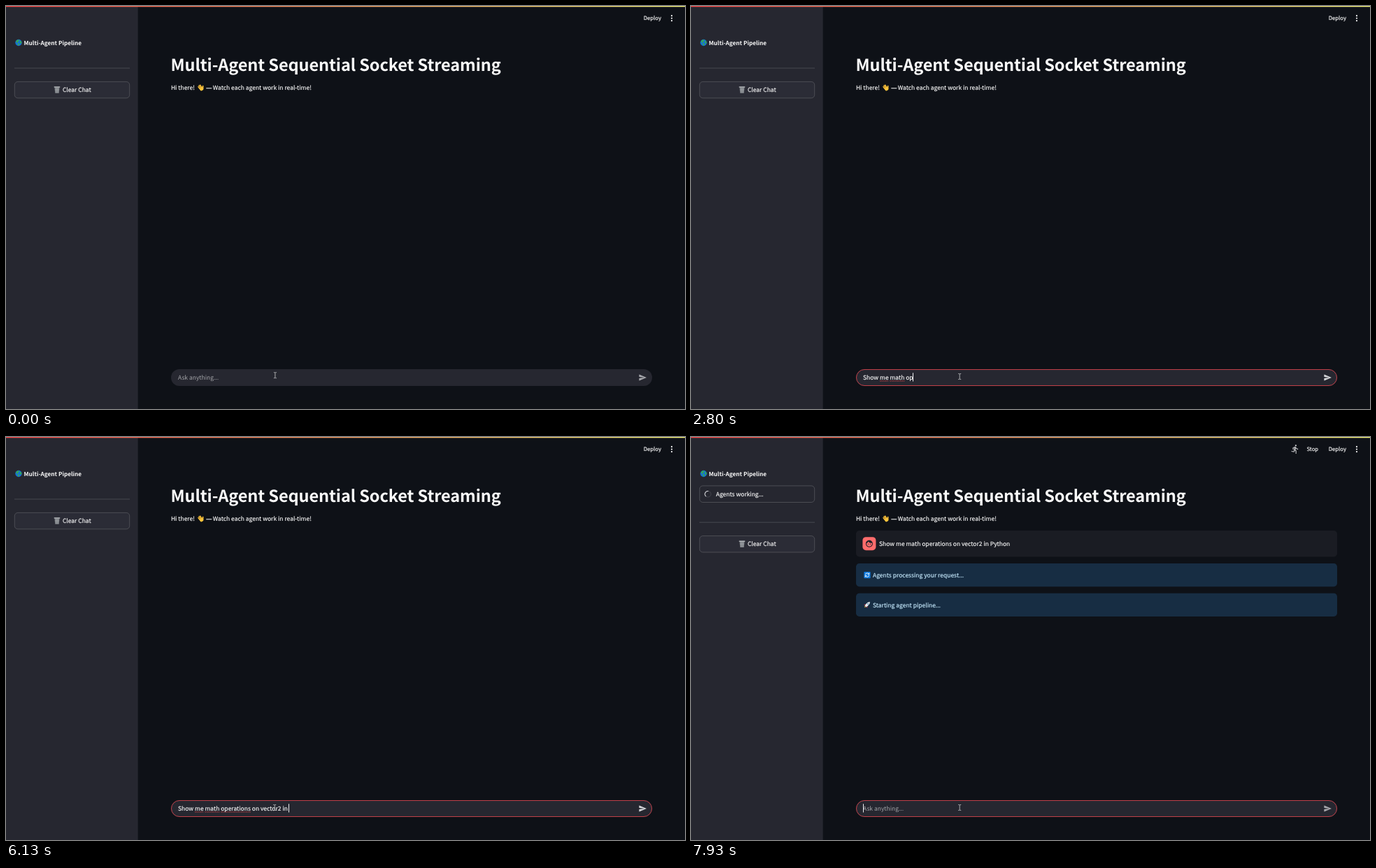
These frames come from a looping animation (971 px wide and 577 px high, 8000 ms). An HTML page:

```html
<!DOCTYPE html>
<html lang="en">
<head>
<meta charset="utf-8">
<title>Multi-Agent Pipeline</title>
<style>
  html, body { margin: 0; width: 100%; height: 100%; overflow: hidden; background: #0e1117; }
  svg { display: block; width: 100%; height: 100%; }
  text {
    font: 8.49px "Noto Sans CJK JP", "Noto Sans CJK SC", "Noto Sans", sans-serif;
    fill: #fafafa; stroke: #fafafa; stroke-width: .15px;
    white-space: pre; text-rendering: geometricPrecision;
  }
  .title { font-size: 23.6px; font-weight: 700; letter-spacing: -.13px; stroke: none; }
  .bold { font-size: 8.24px; font-weight: 700; stroke: none; }
  .small { font-size: 7.7px; }
  .dash { font-family: "Noto Sans", sans-serif; }
  .hint { fill: #a5a6aa; stroke: none; }
  .info text { fill: #c7ebff; stroke: #c7ebff; }
  .panel { fill: #172d43; }
  .outline { stroke: #515259; stroke-width: .9; }
  .squiggle { stroke: #e5484a; stroke-width: 1; stroke-dasharray: 1.6 .8; opacity: .85; }
</style>
</head>
<body>
<svg viewBox="0 0 971 577" preserveAspectRatio="none">
  <defs>
    <linearGradient id="bar"><stop stop-color="#ff4b4b"/><stop offset="1" stop-color="#fffd80"/></linearGradient>
  </defs>
  <rect width="971" height="577" fill="#0e1117"/>
  <rect width="188.7" height="577" fill="#262730"/>
  <rect width="971" height="1.25" fill="url(#bar)"/>

  <!-- sidebar -->
  <g transform="translate(18 52.5)">
    <circle r="4.7" fill="#1673cf"/>
    <path d="M-3.6-2.5Q-2-4.6 1-4.2L.4-2.4-1-1.2-1.4.6-3-.6ZM-1 .8 1.4 1.4.8 3.2-.4 4.2-1.2 2.4ZM2-2.6 3.8-2 4.4.4 3 1.6 1.8-.4Z" fill="#35a853"/>
  </g>
  <text class="bold" x="25.6" y="55.6">Multi-Agent Pipeline</text>
  <g id="status">
    <rect class="outline" x="12.3" y="69.9" width="164.4" height="23.6" rx="4.6" fill="none"/>
    <circle cx="24.2" cy="81.7" r="4.3" fill="none" stroke="#45464e"/>
    <path id="spinner" d="M-4.15-1.1A4.3 4.3 0 0 1 4.15-1.1" fill="none" stroke="#dcdce0"/>
    <text x="35.8" y="85">Agents working...</text>
  </g>
  <g id="lower">
    <path d="M12 89h165" stroke="#4b4c54" stroke-width=".9"/>
    <rect class="outline" x="12.3" y="108.4" width="164.4" height="23.4" rx="4.6" fill="#2b2c36"/>
    <g transform="translate(73 120)">
      <path d="M-3.6-3.4H3.6L2.8 4.8H-2.8Z" fill="#777b80"/>
      <path d="M-1.6-3 -1.2 4.4M0-3V4.4M1.6-3 1.2 4.4M-3 0H3" stroke="#a5a9ad" stroke-width=".6"/>
      <rect x="-4.4" y="-4.8" width="8.8" height="1.6" rx=".7" fill="#b4b8bb"/>
    </g>
    <text x="80.9" y="123.3">Clear Chat</text>
  </g>

  <!-- toolbar -->
  <g id="running">
    <path id="wheels" transform="translate(856.5 9.9) scale(.6)" fill="#d2d3d6" d="M18 2.54a2 2 0 1 0 .01 0zM15 17h-2c0 1.65-1.35 3-3 3s-3-1.35-3-3 1.35-3 3-3v-2c-2.76 0-5 2.24-5 5s2.24 5 5 5 5-2.24 5-5zm3-3.5h-1.86l1.67-3.67C18.42 8.5 17.44 7 15.96 7h-5.2c-.81 0-1.54.47-1.87 1.2L8.22 10l1.92.53.65-1.53H13l-1.83 4.1c-.6 1.33.39 2.9 1.85 2.9H18v5h2v-5.5c0-1.1-.9-2-2-2z"/>
    <path id="runner" transform="translate(856.8 10.2) scale(.6)" fill="#b4b5b8" d="M13.49 5.48c1.1 0 2-.9 2-2s-.9-2-2-2-2 .9-2 2 .9 2 2 2zm-3.6 13.9l1-4.4 2.1 2v6h2v-7.5l-2.1-2 .6-3c1.3 1.5 3.3 2.5 5.5 2.5v-2c-1.9 0-3.5-1-4.3-2.4l-1-1.6c-.4-.6-1-1-1.7-1-.3 0-.5.1-.8.1l-5.2 2.2v4.7h2v-3.4l1.8-.7-1.6 8.1-4.9-1-.4 2 7 1.4z"/>
    <text class="small" x="880.5" y="20.4">Stop</text>
  </g>
  <text class="small" x="911.8" y="20.4">Deploy</text>
  <g fill="#fafafa"><circle cx="952" cy="13.9" r="1.1"/><circle cx="952" cy="17.5" r="1.1"/><circle cx="952" cy="21.1" r="1.1"/></g>

  <!-- heading -->
  <text class="title" x="235.6" y="93">Multi-Agent Sequential Socket Streaming</text>
  <text x="235.9" y="120.4">Hi there!</text>
  <g transform="translate(278.6 117.2) rotate(-35)" stroke="#fcc43c" stroke-width="1.5" stroke-linecap="round">
    <rect x="-2.6" y="-.8" width="5.4" height="5" rx="2" fill="#fcc43c" stroke="none"/>
    <path d="M-2 0V-3.4M-.2 0V-4.2M1.5 0V-3.8M2.4 2 4-.4"/>
    <path d="M-1.1-.4V-3M.7-.4V-3.4" stroke="#c98a1c" stroke-width=".35"/>
  </g>
  <text class="dash" x="285.9" y="120.4">—</text>
  <text x="295.7" y="120.4">Watch each agent work in real-time!</text>

  <!-- conversation -->
  <g id="chat">
    <rect x="236" y="134" width="688" height="37.4" rx="4.7" fill="#1a1c23"/>
    <rect x="245.4" y="143.2" width="19" height="19" rx="4.7" fill="#ff6c6c"/>
    <path transform="translate(248.9 146.8) scale(.5)" fill="#20222a" d="M9 11.75a1.25 1.25 0 1 0 .01 0zm6 0a1.25 1.25 0 1 0 .01 0zM12 2C6.48 2 2 6.48 2 12s4.48 10 10 10 10-4.48 10-10S17.52 2 12 2zm0 18c-4.41 0-8-3.59-8-8 0-.29.02-.58.05-.86 2.36-1.05 4.23-2.98 5.21-5.37C11.07 8.33 14.05 10 17.42 10c.78 0 1.53-.09 2.25-.26.21.71.33 1.47.33 2.26 0 4.41-3.59 8-8 8z"/>
    <text x="269" y="156.4">Show me math operations on vector2 in Python</text>
    <g class="info" id="processing">
      <rect class="panel" x="236" y="181" width="688" height="33.2" rx="4.7"/>
      <rect x="247.4" y="193" width="9.2" height="9.2" rx=".8" fill="#0f7be0"/>
      <path d="M254.6 196.5A2.8 2.8 0 0 0 249.3 197.2M249.4 198.7A2.8 2.8 0 0 0 254.7 198M254.8 194.7V196.7H252.8M249.2 200.5V198.5H251.2" fill="none" stroke="#fff" stroke-width=".9"/>
      <text x="260" y="200.9">Agents processing your request...</text>
    </g>
    <g class="info" id="starting">
      <rect class="panel" x="236" y="223.8" width="688" height="33.2" rx="4.7"/>
      <g transform="translate(252 240) rotate(45)">
        <path d="M-1.8 1-3.5 3.4-1.4 3ZM1.8 1 3.5 3.4 1.4 3Z" fill="#d63b3f"/>
        <path d="M-1.1 3.4H1.1L0 5.8Z" fill="#f5b23c"/>
        <path d="M0-5.6Q2.3-3.2 1.9.6L1.4 3.4H-1.4L-1.9.6Q-2.3-3.2 0-5.6Z" fill="#e6eaee"/>
        <circle cy="-1.5" r=".9" fill="#3c7dae"/>
      </g>
      <text x="260" y="243.8">Starting agent pipeline...</text>
    </g>
  </g>

  <!-- input -->
  <rect x="236" y="520" width="688" height="24" rx="12" fill="#262730"/>
  <rect id="focus" x="236.5" y="520.5" width="687" height="23" rx="11.5" fill="none" stroke="#c04049"/>
  <path id="send" transform="translate(904.4 526) scale(.505)" d="M2 21l21-9L2 3v7l15 2-15 2z"/>
  <text class="hint" id="hint" x="246" y="535">Ask anything...</text>
  <g id="marks"></g>
  <text id="typed" x="246" y="535">Show me math operations on vector2 in Python</text>
  <rect id="caret" y="525.3" width="1" height="12.2" fill="#f0f0f2"/>
  <path id="mouse" d="M-2-4H-.6L0-3.5.6-4H2M0-3.5V3.5M-2 4H-.6L0 3.5.6 4H2" fill="none" stroke="#b9babd" stroke-width=".9"/>
</svg>
<script>
  const LOOP = 8000, FOCUS = 270, SUBMIT = 7130, LEFT = 246, BLINK = 530;
  const keyTimes = [
    800, 1130, 1200, 1330, 1400, 1530, 1670, 1730, 1870, 1930, 2070, 2130, 2330,
    2600, 2800, 2870, 3000, 3070, 3130, 3270, 3330, 3400, 3530, 3600, 4400, 4470, 4530,
    4670, 4800, 4870, 5070, 5130, 5270, 5670, 5730, 6000, 6070, 6130,
    6330, 6470, 6730, 6800, 6800, 6870
  ];
  const $ = id => document.getElementById(id);
  const show = (id, on) => $(id).style.display = on ? '' : 'none';
  const fade = (id, t, start, length) =>
    $(id).style.opacity = Math.min(1, Math.max(0, (t - start) / length));

  const message = $('typed').textContent;
  const edges = [LEFT, ...Array.from(message, (_, i) => $('typed').getEndPositionOfChar(i).x)];

  // Words the spell checker underlines once the following space is typed
  const marks = ['me', 'math', 'operations'].map(word => {
    const from = message.indexOf(word), to = from + word.length;
    const line = document.createElementNS('http://www.w3.org/2000/svg', 'path');
    line.setAttribute('class', 'squiggle');
    line.setAttribute('d', `M${edges[from]} 536.9H${edges[to]}`);
    $('marks').append(line);
    return { line, to };
  });

  function draw(t) {
    const sent = t >= SUBMIT;
    const pressed = keyTimes.filter(k => k <= t);
    const count = sent ? 0 : pressed.length;
    $('typed').textContent = message.slice(0, count);
    marks.forEach(({ line, to }) => line.style.display = count > to ? '' : 'none');
    show('hint', !count);
    show('focus', t >= FOCUS);
    $('send').setAttribute('fill', count ? '#d6d7da' : '#a8a9ae');

    // The caret starts blinking anew after every key
    const lastKey = Math.max(FOCUS, ...pressed);
    show('caret', t >= FOCUS && Math.floor((t - lastKey) / BLINK) % 2 === 0);
    $('caret').setAttribute('x', Math.floor(edges[count]));
    $('mouse').setAttribute('transform', t < 70 ? 'translate(384.9 528.7)' : 'translate(384.2 530.5)');

    for (const id of ['status', 'running', 'chat']) show(id, sent);
    $('lower').setAttribute('transform', `translate(0 ${sent ? 33.2 : 0})`);
    if (!sent) return;
    fade('running', t, SUBMIT, 140);
    fade('processing', t, SUBMIT, 300);
    fade('starting', t, SUBMIT + 20, 300);
    show('wheels', t < 7600);
    show('runner', t >= 7600);
    const angle = 30 + (t - 7200) * .36;
    $('spinner').setAttribute('transform', `translate(24.2 81.7) rotate(${angle})`);
  }

  const begin = performance.now();
  function tick() {
    draw((performance.now() - begin) % LOOP);
    requestAnimationFrame(tick);
  }
  tick();
</script>
</body>
</html>
```
